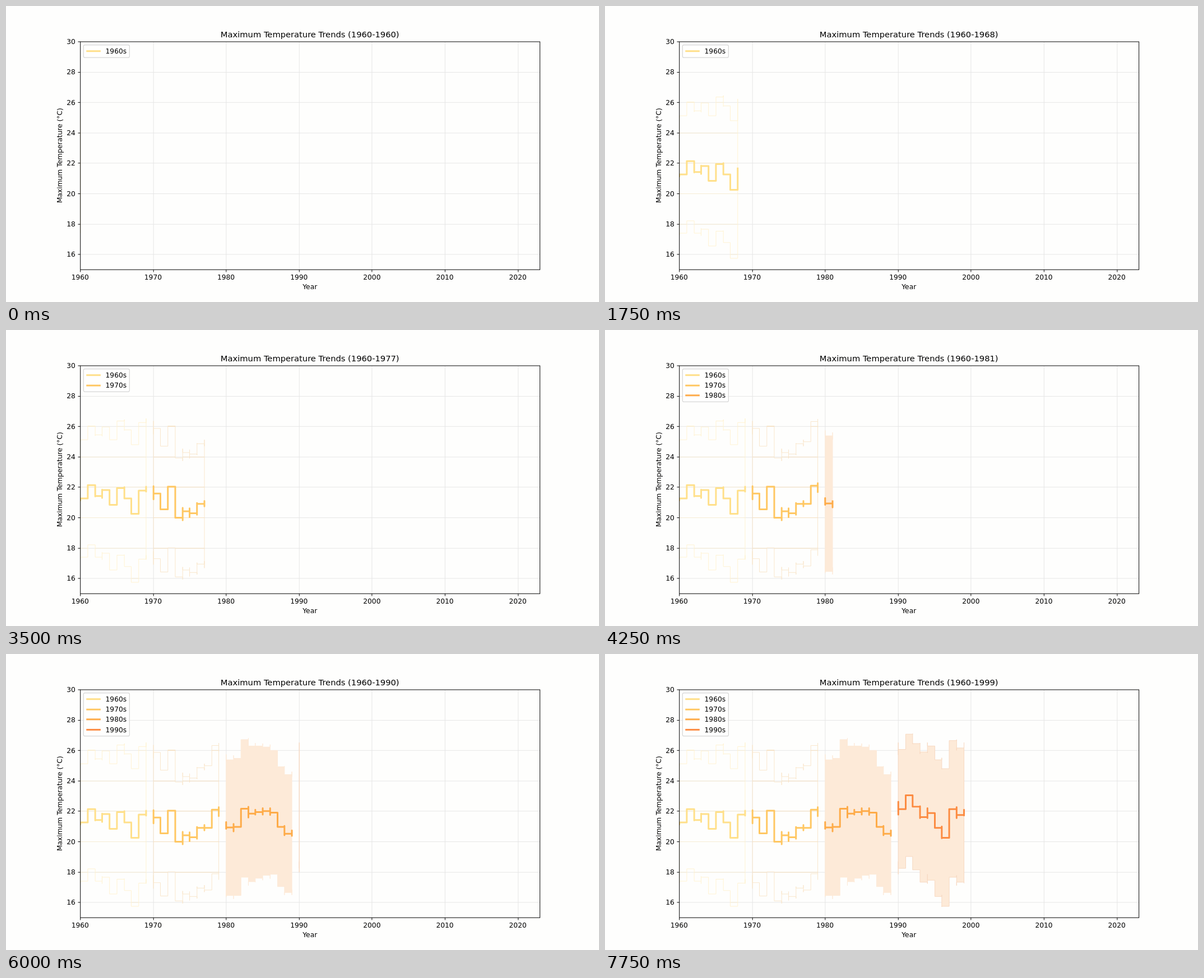
An HTML page with a canvas for the animation above (8000 ms loop, 1058 by 529 pixels).

```html
<!DOCTYPE html>
<html lang="en">
<head>
<meta charset="utf-8">
<title>Maximum Temperature Trends</title>
<style>
  html, body { margin: 0; width: 100%; height: 100%; overflow: hidden; background: #fefefd; }
  canvas { display: block; }
</style>
</head>
<body>
<canvas id="c" width="1058" height="529"></canvas>
<script>
const ctx = document.getElementById('c').getContext('2d');
const LOOP = 8000, STEP = 250, YEARS_PER_STEP = 64 / 50;
const FONT = '"DejaVu Sans", Verdana, sans-serif';

// The chart is laid out on a 1200 x 600 sheet and scaled to the stage.
const SCALE = 1058 / 1200;
const LEFT = 150, RIGHT = 1080, TOP = 72, BOTTOM = 534;
const LINE = 3.4, THIN = 1.11;

const snap = v => Math.floor(v + 0.5) + 0.5;
const yearX = y => LEFT + (RIGHT - LEFT) * y / 63;      // years since 1960
const tempY = t => TOP + (BOTTOM - TOP) * (30 - t) / 15;
const [L, R, T, B] = [LEFT, RIGHT, TOP, BOTTOM].map(snap);

// Yearly means in °C; each decade is a separate line.
const decades = [
  { line: '#ffe08a', edge: '#fff3d2', tint: '#f7edd4',
    means: [21.26, 22.13, 21.43, 21.82, 20.84, 21.96, 21.28, 20.27, 21.78] },
  { line: '#ffc762', edge: '#f9e7cc', tint: '#f5dfbf',
    means: [21.6, 20.56, 22.04, 20.01, 20.43, 20.29, 20.91, 20.91, 22.11] },
  { line: '#feab48', edge: '#fdead8', fill: '#fdead8',
    means: [20.93, 20.97, 22.19, 21.84, 21.95, 22, 21.93, 20.99, 20.53] },
  { line: '#fc8b41', edge: '#f7d9c1', fill: '#fdead8',
    means: [22.15, 23.05, 22.3, 21.61, 21.89, 20.9, 20.27, 22.15, 21.74] }
];

// Half width of the band, swinging slowly over the years.
const spread = y => 4.2 + 0.33 * Math.cos(2 * Math.PI * (y - 7) / 14.5);

function noise(n) {
  const v = Math.sin(n * 12.9898) * 43758.5453;
  return v - Math.floor(v);
}

// First part of a chain of values, by travelled distance.
function walk(chain, share) {
  let left = 0;
  for (let i = 1; i < chain.length; i++) left += Math.abs(chain[i] - chain[i - 1]);
  left *= share;
  const out = [chain[0]];
  for (let i = 1; i < chain.length; i++) {
    const d = chain[i] - chain[i - 1];
    const go = Math.min(Math.abs(d), left);
    out.push(chain[i - 1] + Math.sign(d) * go);
    left -= go;
    if (left <= 0) break;
  }
  return out;
}

// Staircase of a decade up to `pos` years; side -1, 0, 1 is lower edge, mean, upper edge.
// Years with a small step overshoot more.
function trace({ means }, first, pos, side) {
  const pts = [];
  const level = i => means[i] + side * spread(first + i);
  for (let i = 0; i < 10 && first + i <= pos; i++) {
    const year = first + i;
    const a = level(Math.max(i - 1, 0)), b = level(Math.min(i, 8));
    const dir = b > a ? 1 : -1;
    const spare = 0.6 * Math.max(0, 0.8 - Math.abs(b - a));
    const chain = [a, a - dir * spare * noise(year), b + dir * spare * noise(year + 0.5), b];
    for (const t of walk(chain, Math.min(1, pos - year))) {
      pts.push([snap(yearX(year)), snap(tempY(t))]);
    }
  }
  return pts;
}

function poly(pts) {
  ctx.beginPath();
  for (const [x, y] of pts) ctx.lineTo(x, y);
}

function stroke(color, width = THIN) {
  ctx.strokeStyle = color;
  ctx.lineWidth = width;
  ctx.stroke();
}

function seg(x1, y1, x2, y2, color, width) {
  poly([[x1, y1], [x2, y2]]);
  stroke(color, width);
}

function text(str, x, y, align = 'center', size = 13.89) {
  ctx.font = `${size}px ${FONT}`;
  ctx.textAlign = align;
  ctx.fillStyle = '#000';
  ctx.fillText(str, x, y);
}

function rows(color) {
  for (let t = 16; t < 30; t += 2) seg(L, snap(tempY(t)), R, snap(tempY(t)), color);
}

function band(d, first, pos) {
  poly([...trace(d, first, pos, 1), ...trace(d, first, pos, -1).reverse()]);
  ctx.closePath();
  if (d.fill) {
    ctx.fillStyle = d.fill;
    ctx.fill();
  }
  stroke(d.edge);
  if (d.tint) {
    ctx.save();
    ctx.clip();
    rows(d.tint);
    ctx.restore();
  }
}

function axes(year) {
  for (let y = 0; y <= 60; y += 10) {
    const x = snap(yearX(y));
    seg(x, B, x, B + 4.86, '#000');
    text(1960 + y, yearX(y), 555);
  }
  for (let t = 16; t <= 30; t += 2) {
    const y = snap(tempY(t));
    seg(L - 4.86, y, L, y, '#000');
    text(t, 140.3, tempY(t) + 5.2, 'right');
  }
  ctx.strokeStyle = '#000';
  ctx.lineWidth = THIN;
  ctx.strokeRect(L, T, R - L, B - T);

  const mid = (LEFT + RIGHT) / 2;
  text('Year', mid, 574);
  text(`Maximum Temperature Trends (1960-${year})`, mid, 64, 'center', 16.67);
  ctx.save();
  ctx.translate(113.8, (TOP + BOTTOM) / 2);
  ctx.rotate(-Math.PI / 2);
  text('Maximum Temperature (°C)', 0, 0);
  ctx.restore();
}

function legend(count) {
  ctx.beginPath();
  ctx.roundRect(156.9, 78.9, 93, 5 + 20.6 * count, 2.8);
  ctx.fillStyle = 'rgba(255,255,255,0.8)';
  ctx.fill();
  stroke('#d6d6d6', 1.39);
  for (let i = 0; i < count; i++) {
    const y = snap(91 + 20.6 * i);
    seg(162.5, y, 191.5, y, decades[i].line, LINE);
    text(`${1960 + 10 * i}s`, 201.4, y + 4.8, 'left');
  }
}

function draw(ms) {
  const pos = Math.floor((ms % LOOP) / STEP) * YEARS_PER_STEP;
  const now = Math.floor(pos);
  const shown = decades.slice(0, Math.floor(now / 10) + 1);

  ctx.setTransform(SCALE, 0, 0, SCALE, 0, 0);
  ctx.fillStyle = '#fefefd';
  ctx.fillRect(0, 0, 1200, 600);
  for (let y = 10; y <= 60; y += 10) seg(snap(yearX(y)), T, snap(yearX(y)), B, '#e6e6e6');
  rows('#e6e6e6');

  ctx.save();
  ctx.beginPath();
  ctx.rect(LEFT, TOP, RIGHT - LEFT, BOTTOM - TOP);
  ctx.clip();
  ctx.lineJoin = 'round';
  shown.forEach((d, i) => band(d, 10 * i, pos));
  shown.forEach((d, i) => {
    if (now === 10 * i) return;    // a line needs two years
    poly(trace(d, 10 * i, pos, 0));
    stroke(d.line, LINE);
  });
  ctx.restore();

  axes(1960 + now);
  legend(shown.length);
}

const start = performance.now();
function tick() {
  draw(performance.now() - start);
  requestAnimationFrame(tick);
}
tick();
</script>
</body>
</html>
```
